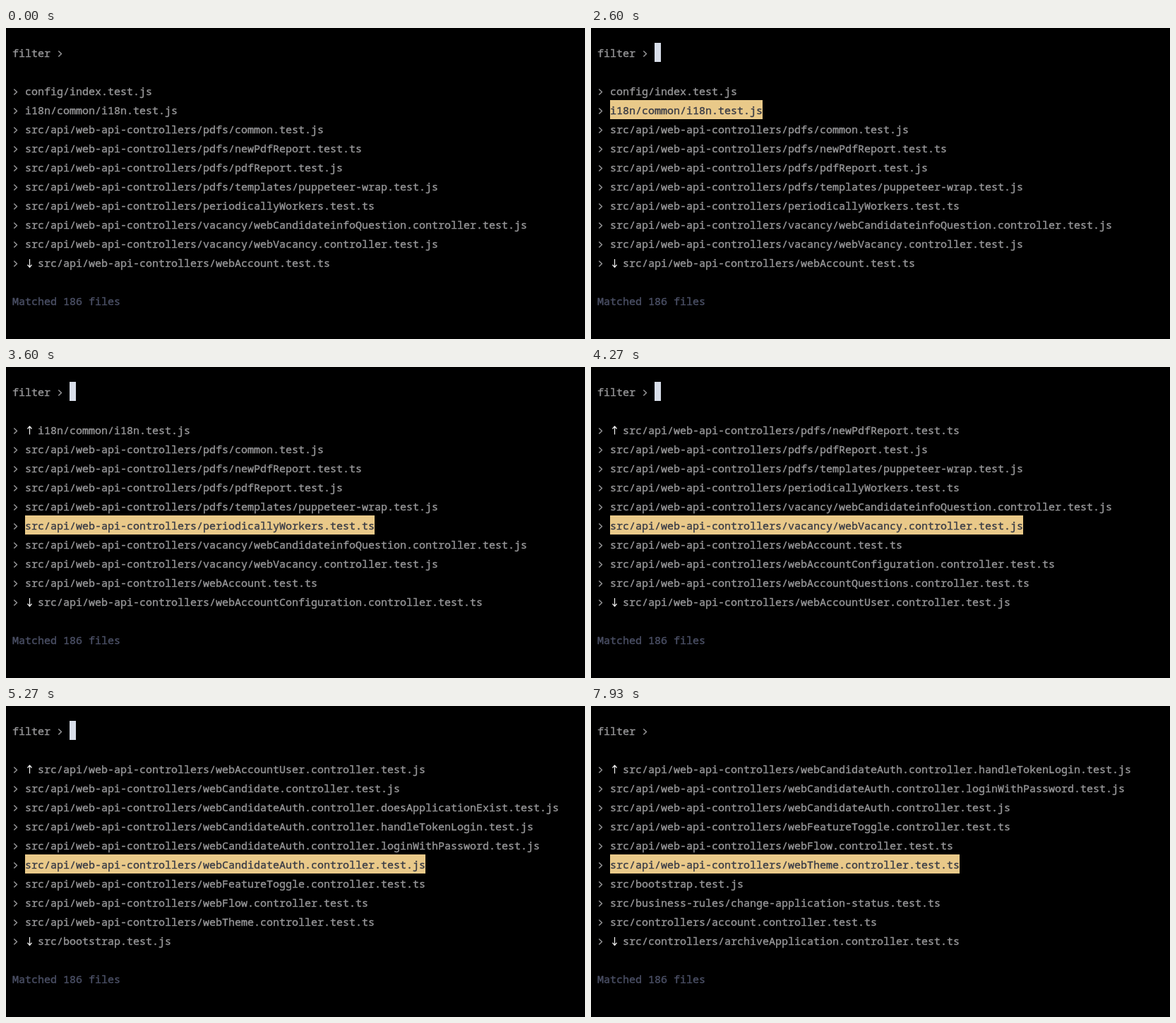
An HTML page with a canvas that plays this animation: 820 by 440 pixels, repeating every 8 s.

```html
<!DOCTYPE html>
<html lang="en">
<head>
<meta charset="utf-8">
<title>Test file filter</title>
<style>
  html, body { margin: 0; width: 100%; height: 100%; overflow: hidden; background: #000; }
  canvas { display: block; }
</style>
</head>
<body>
<canvas id="stage" width="820" height="440"></canvas>
<script>
const ctx = document.getElementById('stage').getContext('2d');

const LOOP = 8000;
const CELL = 9;
const LINE = 27;
const TOP = 21;
const BASELINE = 20;
const VISIBLE = 10;
const COLORS = {
  text: '#969698',
  faint: '#4b5066',
  cursor: '#d8dee9',
  highlight: '#e9c989',
  selected: '#3a3c46',
  arrow: '#f2f2f2'
};

const API = 'src/api/web-api-controllers/';
const AUTH = 'webCandidateAuth.controller.';
const files = [
  'config/index.test.js',
  'i18n/common/i18n.test.js',
  API + 'pdfs/common.test.js',
  API + 'pdfs/newPdfReport.test.ts',
  API + 'pdfs/pdfReport.test.js',
  API + 'pdfs/templates/puppeteer-wrap.test.js',
  API + 'periodicallyWorkers.test.ts',
  API + 'vacancy/webCandidateinfoQuestion.controller.test.js',
  API + 'vacancy/webVacancy.controller.test.js',
  API + 'webAccount.test.ts',
  API + 'webAccountConfiguration.controller.test.ts',
  API + 'webAccountQuestions.controller.test.ts',
  API + 'webAccountUser.controller.test.js',
  API + 'webCandidate.controller.test.js',
  API + AUTH + 'doesApplicationExist.test.js',
  API + AUTH + 'handleTokenLogin.test.js',
  API + AUTH + 'loginWithPassword.test.js',
  API + AUTH + 'test.js',
  API + 'webFeatureToggle.controller.test.ts',
  API + 'webFlow.controller.test.ts',
  API + 'webTheme.controller.test.ts',
  'src/bootstrap.test.js',
  'src/business-rules/change-application-status.test.ts',
  'src/controllers/account.controller.test.ts',
  'src/controllers/archiveApplication.controller.test.ts'
];

// [time, selected index]
const selections = [
  [0, -1], [2270, 0], [2600, 1], [2800, 2], [3000, 3], [3270, 4], [3400, 5],
  [3600, 6], [3800, 7], [4270, 8], [4330, 10], [4400, 13], [4730, 14],
  [4930, 15], [5070, 16], [5270, 17], [5400, 18], [5600, 19], [5730, 20]
];
const cursorToggles = [270, 870, 1470, 2070, 2270, 6330, 6930, 7930];

const rowTop = row => TOP + row * LINE;

// The thin outline gives the text a medium weight.
function write(text, column, row, color) {
  const x = column * CELL;
  const y = rowTop(row) + BASELINE;
  ctx.fillStyle = ctx.strokeStyle = color;
  ctx.lineWidth = 0.4;
  ctx.fillText(text, x, y);
  ctx.strokeText(text, x, y);
}

function drawLine(points, color, width) {
  ctx.strokeStyle = color;
  ctx.lineWidth = width;
  ctx.beginPath();
  points.forEach(([x, y]) => ctx.lineTo(x, y));
  ctx.stroke();
}

function drawChevron(column, row) {
  const x = column * CELL + 2.3;
  const y = rowTop(row) + 15.5;
  drawLine([[x, y - 4], [x + 4.2, y], [x, y + 4]], COLORS.text, 1.5);
}

function drawArrow(row, up) {
  const x = 33.5;
  const y = rowTop(row);
  const tip = y + (up ? 9 : 20.5);
  const tail = y + (up ? 20.5 : 9);
  const barb = tip + (up ? 3.5 : -3.5);
  drawLine([[x, tail], [x, tip]], COLORS.arrow, 1.2);
  drawLine([[x - 3, barb], [x, tip], [x + 3, barb]], COLORS.arrow, 1.2);
}

function drawFile(slot, index, selected, arrow) {
  const row = slot + 2;
  const name = files[index];
  const column = arrow ? 5 : 3;
  drawChevron(1, row);
  if (arrow) drawArrow(row, arrow === 'up');
  if (selected) {
    ctx.fillStyle = COLORS.highlight;
    ctx.fillRect(column * CELL, rowTop(row), name.length * CELL, LINE);
  }
  write(name, column, row, selected ? COLORS.selected : COLORS.text);
}

function draw(time) {
  const selected = selections.filter(([start]) => start <= time).pop()[1];
  const offset = Math.max(0, selected - 5);
  const cursorOn = cursorToggles.filter(start => start <= time).length % 2 === 1;

  ctx.fillStyle = '#000';
  ctx.fillRect(0, 0, 820, 440);
  ctx.font = '500 15px "Noto Sans Mono", monospace';
  ctx.textBaseline = 'alphabetic';
  ctx.lineJoin = 'round';

  write('filter', 1, 0, COLORS.text);
  drawChevron(8, 0);
  if (cursorOn) {
    ctx.fillStyle = COLORS.cursor;
    ctx.fillRect(10 * CELL, TOP, CELL, LINE);
  }
  for (let slot = 0; slot < VISIBLE; slot++) {
    const arrow = slot === VISIBLE - 1 ? 'down' : slot === 0 && offset > 0 ? 'up' : '';
    drawFile(slot, offset + slot, offset + slot === selected, arrow);
  }
  write('Matched 186 files', 1, 13, COLORS.faint);
}

const started = performance.now();
function tick() {
  draw((performance.now() - started) % LOOP);
  requestAnimationFrame(tick);
}
tick();
</script>
</body>
</html>
```
